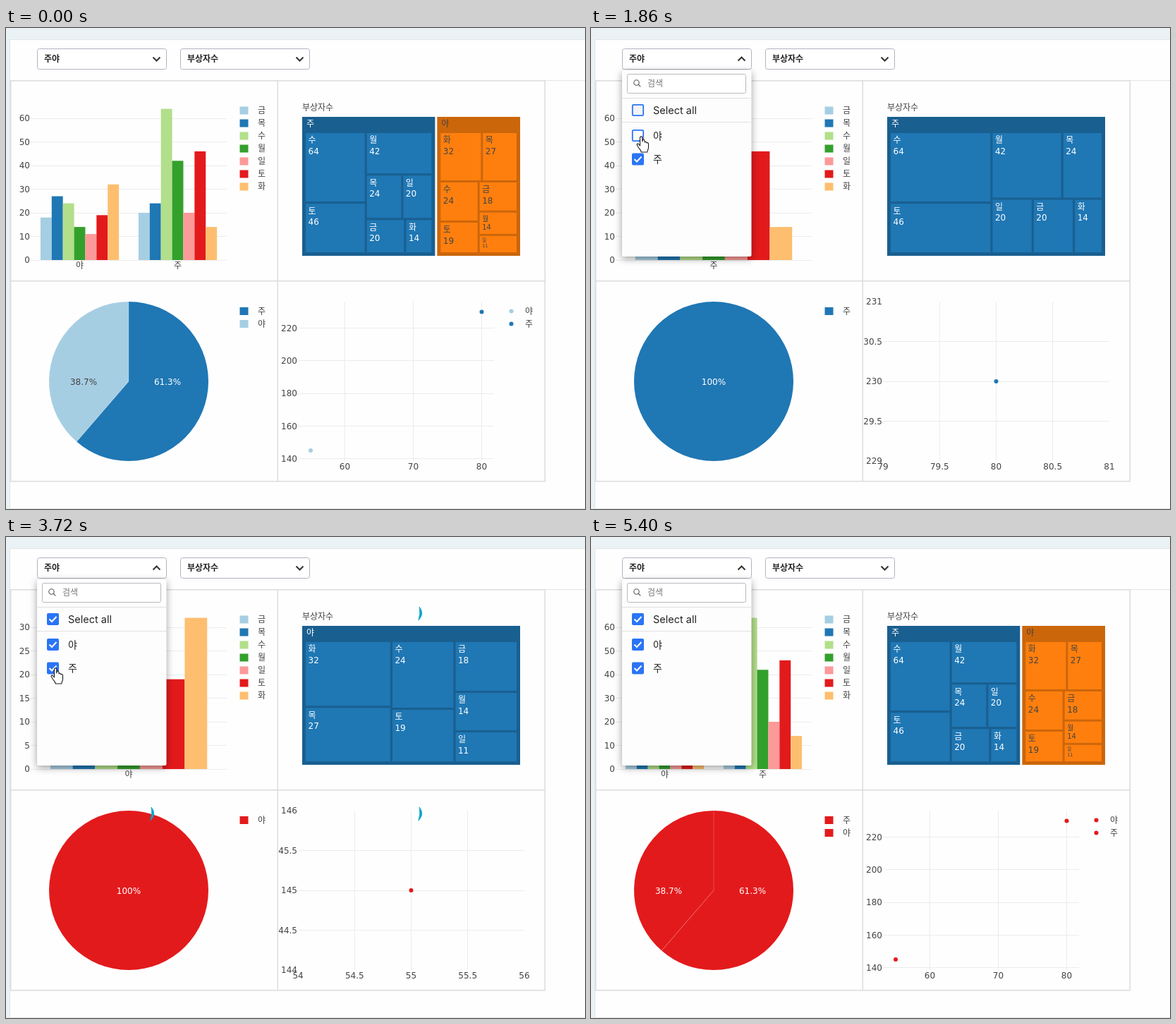
An HTML page with a canvas that plays this animation: 821 px wide and 682 px high, repeating every 5970 ms.

```html
<!DOCTYPE html>
<html lang="ko">
<head>
<meta charset="utf-8">
<title>Dashboard filter</title>
<style>
  html, body { margin: 0; width: 100%; height: 100%; overflow: hidden; background: #fefefe; }
  canvas { display: block; }
</style>
</head>
<body>
<canvas id="stage" width="821" height="682"></canvas>
<script>
const ctx = document.getElementById('stage').getContext('2d');
const LOOP = 5970;
const CHART_FONT = '"DejaVu Sans", "Noto Sans CJK KR", "Noto Sans CJK", sans-serif';
const UI_FONT = 'Inter, "Noto Sans CJK KR", "Noto Sans CJK", sans-serif';
const BLUE = '#1f77b4', RED = '#e31a1c', PALE = '#a6cee3', INK = '#444', GRID = '#ececec';
const DAYS = [...'금목수월일토화'];
const PALETTE = [PALE, BLUE, '#b2df8a', '#33a02c', '#fb9a99', RED, '#fdbf6f'];
const NIGHT = { name: '야', values: [18, 27, 24, 14, 11, 19, 32], x: 55, y: 145 };
const DAY = { name: '주', values: [20, 24, 64, 42, 20, 46, 14], x: 80, y: 230 };

// Chart states: start time, colour per group (null = filtered out)
const STATES = [
  { from: 0, night: PALE, day: BLUE },
  { from: 1830, night: null, day: BLUE },
  { from: 2490, night: RED, day: BLUE },
  { from: 3210, night: RED, day: null },
  { from: 3990, night: RED, day: RED },
];
const LOADS = [[1560, 1830], [2280, 2490], [2910, 3210], [3720, 3990]];
const CURSOR = [
  [90, 800, 46], [120, 617, 60], [150, 341, 74], [180, 200, 76], [240, 98, 70], [330, 115, 62],
  [450, 131, 60], [960, 131, 60], [1140, 110, 105], [1260, 80, 161], [1380, 71, 154],
  [2300, 71, 154], [2490, 69.5, 183], [2580, 70, 186], [4590, 70, 186], [4700, 222, 378],
  [4800, 302, 426], [4920, 403, 476], [5160, 447, 549], [5190, 441, 566], [5220, 402, 572],
  [5280, 315, 536], [5310, 290, 528], [5340, 288, 482], [5370, 650, 228], [5400, 650, 228],
];

const total = list => list.reduce((a, b) => a + b, 0);
const between = (t, a, b) => t >= a && t < b;
const clamp = v => Math.max(0, Math.min(1, v));
const easeInOut = v => { v = clamp(v); return v < .5 ? 4 * v ** 3 : 1 - (2 - 2 * v) ** 3 / 2; };
// Approximates cubic-bezier(.4, 0, .2, 1)
const easeStandard = v => easeInOut(clamp(v) ** .8);

function text(str, x, y, { size = 12, color = INK, align = 'left', weight = 400, font = CHART_FONT } = {}) {
  ctx.font = `${weight} ${size}px ${font}`;
  ctx.textAlign = align;
  ctx.fillStyle = color;
  ctx.fillText(str, x, y + size * .37);
}
function rect(x, y, w, h, color) {
  ctx.fillStyle = color;
  ctx.fillRect(x, y, w, h);
}
function line(points, color, width = 1) {
  ctx.beginPath();
  points.forEach(([x, y]) => ctx.lineTo(x, y));
  ctx.strokeStyle = color;
  ctx.lineWidth = width;
  ctx.stroke();
}
function box(x, y, w, h, r, fill, stroke, width = 1) {
  ctx.beginPath();
  ctx.roundRect(x, y, w, h, r);
  if (fill) { ctx.fillStyle = fill; ctx.fill(); }
  if (stroke) { ctx.strokeStyle = stroke; ctx.lineWidth = width; ctx.stroke(); }
}
function dot(x, y, color, r = 3) {
  ctx.beginPath();
  ctx.arc(x, y, r, 0, 7);
  ctx.fillStyle = color;
  ctx.fill();
}
const hLine = (y, x0, x1, color = GRID) => rect(x0, Math.floor(y), x1 - x0, 1, color);
const vLine = (x, y0, y1, color = GRID) => rect(Math.floor(x), y0, 1, y1 - y0, color);

function page() {
  rect(0, 0, 821, 682, '#ebf2f5');
  rect(5, 16, 816, 666, '#e3e5e6');
  rect(6, 17, 815, 664, '#fefefe');
  hLine(74, 6, 821, '#e4e4e4');
  for (const y of [74, 358, 642]) rect(6, y, 759, 1.5, '#dcdcdc');
  for (const x of [6, 384.5, 763.5]) rect(x, 74, 1.5, 569, '#dcdcdc');
}

function select(x, label, open) {
  box(x + .5, 29.5, 183, 29, 3, '#fff', '#b3b1c2');
  text(label, x + 10, 44, { weight: 700, color: '#222', font: UI_FONT });
  const d = open ? -2.5 : 2.5;
  line([[x + 164.5, 44 - d], [x + 169.5, 44 + d], [x + 174.5, 44 - d]], '#333', 2);
}

function barChart(groups) {
  const step = 278 / groups.length, width = step * .8 / 7;
  const unit = groups.includes(DAY) ? 10 : 5;
  for (let i = 0; i < 7; i++) {
    const y = 329 - i * 33.5;
    hLine(y, 35, 313);
    text(i * unit, 34, y, { align: 'right' });
  }
  groups.forEach((group, g) => {
    const mid = 35 + step * (g + .5);
    group.values.forEach((v, i) => {
      const h = v / unit * 33.5;
      rect(mid + (i - 3.5) * width, 329 - h, width, h, PALETTE[i]);
    });
    text(group.name, mid, 337, { align: 'center' });
  });
  DAYS.forEach((day, i) => legend(day, 117 + 18 * i, PALETTE[i]));
}
function legend(label, y, color) {
  rect(331.5, y - 5.5, 12, 11, color);
  text(label, 357, y);
}

// Squarified layout of items sorted by falling value, with a gap of 3 between tiles
function squarify(items, x0, y0, x1, y1) {
  const tiles = [];
  let rest = total(items.map(d => d.value));
  x0 -= 1.5; y0 -= 1.5; x1 += 1.5; y1 += 1.5;
  for (let i = 0, j; i < items.length; i = j) {
    const dx = x1 - x0, dy = y1 - y0, alpha = Math.max(dx / dy, dy / dx) / rest;
    const worst = (sum, last) => Math.max(items[i].value / (sum * sum * alpha), sum * sum * alpha / last);
    let sum = items[i].value, ratio = worst(sum, sum);
    for (j = i + 1; j < items.length; j++) {
      const v = items[j].value, next = worst(sum + v, v);
      if (next > ratio) break;
      ratio = next;
      sum += v;
    }
    const across = dx < dy, depth = (across ? dy : dx) * sum / rest;
    let pos = across ? x0 : y0;
    for (const item of items.slice(i, j)) {
      const len = (across ? dx : dy) * item.value / sum;
      const [x, y, w, h] = across ? [pos, y0, len, depth] : [x0, pos, depth, len];
      tiles.push({ item, x: x + 1.5, y: y + 1.5, w: w - 3, h: h - 3 });
      pos += len;
    }
    if (across) y0 += depth; else x0 += depth;
    rest -= sum;
  }
  return tiles;
}

function treemap(groups) {
  const styles = [[BLUE, '#195f90', '#fff'], ['#ff7f0e', '#cc660b', INK]];
  const roots = groups.map(group => ({ group, value: total(group.values) })).sort((a, b) => b.value - a.value);
  text('부상자수', 420, 113);
  squarify(roots, 420, 126, 729, 323).forEach(({ item, x, y, w, h }, n) => {
    const [fill, dark, color] = styles[n];
    rect(x, y, w, h, dark);
    text(item.group.name, x + 6, y + 10, { color });
    const leaves = item.group.values.map((value, i) => ({ value, name: DAYS[i] }))
      .reverse().sort((a, b) => b.value - a.value);
    for (const tile of squarify(leaves, x + 5, y + 23, x + w - 5, y + h - 5)) {
      const scale = Math.min(1, (tile.h - 9.5) / 25), size = 12 * scale;
      rect(tile.x, tile.y, tile.w, tile.h, fill);
      text(tile.item.name, tile.x + 3.5, tile.y + 10 * scale, { size, color });
      text(tile.item.value, tile.x + 3.5, tile.y + 25.3 * scale, { size, color });
    }
  });
}

function pieChart({ night, day }) {
  const slice = (a, b, color) => {
    ctx.beginPath();
    ctx.moveTo(174, 501);
    ctx.arc(174, 501, 113, a - Math.PI / 2, b - Math.PI / 2);
    ctx.fillStyle = color;
    ctx.fill();
  };
  const label = (str, x, color = '#fff') => text(str, x, 501.5, { align: 'center', color });
  if (night && day) {
    const turn = Math.PI * 2, cut = turn * 230 / 375;
    slice(0, cut, day);
    slice(cut, turn, night);
    const edge = [174 + 113 * Math.sin(cut), 501 - 113 * Math.cos(cut)];
    line([[174, 388], [174, 501], edge], 'rgba(255,255,255,.3)', .7);
    label('61.3%', 229);
    label('38.7%', 110, night === PALE ? INK : '#fff');
    legend('주', 401.5, day);
    legend('야', 419.5, night);
  } else {
    dot(174, 501, night || day, 113);
    label('100%', 174);
    legend(night ? '야' : '주', 401.5, night || day);
  }
}

function scatter({ night, day }) {
  ctx.save();
  ctx.beginPath();
  ctx.rect(386, 360, 378, 282);
  ctx.clip();
  if (night && day) {
    const px = v => 480.5 + (v - 60) * 9.7, py = v => 610.5 - (v - 140) * 2.312;
    for (const v of [60, 70, 80]) { vLine(px(v), 388, 614); text(v, px(v), 622, { align: 'center' }); }
    for (const v of [140, 160, 180, 200, 220]) { hLine(py(v), 415, 692); text(v, 413, py(v), { align: 'right' }); }
    dot(px(55), py(145), night);
    dot(px(80), py(230), day);
    [['야', night], ['주', day]].forEach(([name, color], i) => {
      dot(716.5, 401.5 + 18 * i, color);
      text(name, 736, 401.5 + 18 * i);
    });
  } else {
    const group = night ? NIGHT : DAY;
    for (let i = -2; i <= 2; i++) {
      const x = 574.5 + i * 80.2, y = 501 - i * 56.5;
      if (Math.abs(i) < 2) { vLine(x, 388, 614); hLine(y, 415, 735); }
      text(group.x + i / 2, x, 622, { align: 'center' });
      text(group.y + i / 2, 413, y, { align: 'right' });
    }
    dot(574.5, 501, night || day);
  }
  ctx.restore();
}

function loading(since) {
  rect(6, 74, 759, 569, `rgba(0,0,0,${.05 * clamp(since / 120)})`);
  for (const [x, y] of [[197, 108], [577, 108], [197, 392], [577, 392]]) {
    ctx.save();
    ctx.translate(x, y);
    ctx.rotate((since - 240) / 1000 * Math.PI * 2);
    ctx.beginPath();
    ctx.moveTo(-9.5, 8.5);
    ctx.quadraticCurveTo(0, 17, 9.5, 8.5);
    ctx.quadraticCurveTo(0, 11, -9.5, 8.5);
    ctx.fillStyle = ctx.strokeStyle = '#0ba5c8';
    ctx.lineWidth = .8;
    ctx.fill();
    ctx.stroke();
    ctx.restore();
  }
}

function checkRow(label, y, checked, size, partial) {
  if (checked) {
    box(58, y - 8.5, 17, 17, 2, '#2a74f6');
    line([[61.5, y], [65, y + 3.5], [71.5, y - 3.5]], '#fff', 2);
  } else {
    box(58.8, y - 7.7, 15.4, 15.4, 1.5, partial ? '#f2f3f5' : '#fff', '#2a74f6', 1.8);
  }
  text(label, 88, y, { size, color: '#222', font: UI_FONT });
}

function dropdown(t) {
  const since = t - 680;
  if (since <= 10) return;
  const scale = .75 + .25 * easeStandard(since / 200);
  ctx.save();
  ctx.globalAlpha = easeStandard(since / 302);
  ctx.translate(44, 59);
  ctx.scale(scale, scale * scale);
  ctx.translate(-44, -59);
  ctx.save();
  ctx.shadowColor = 'rgba(0,0,0,.38)';
  ctx.shadowBlur = 11;
  ctx.shadowOffsetY = 3;
  box(44, 60, 183.5, 264, 2, '#fdfdfd');
  ctx.restore();
  box(51.5, 65.5, 168, 27, 2, '#fff', '#b8b8c0');
  ctx.beginPath();
  ctx.arc(64.5, 77.5, 3.7, 0, 7);
  ctx.strokeStyle = '#555';
  ctx.lineWidth = 1.1;
  ctx.stroke();
  line([[67.2, 80.2], [70.3, 83.3]], '#555', 1.2);
  text('검색', 80, 78.5, { color: '#777', font: UI_FONT });
  hLine(99, 44, 227, '#e0e0e0');
  hLine(133, 44, 227, '#e0e0e0');
  const night = !between(t, 1560, 2280), day = !between(t, 2910, 3720);
  checkRow('Select all', 116.5, night && day, 14.5, true);
  checkRow('야', 152.5, night, 14);
  checkRow('주', 186, day, 14);
  ctx.restore();
}

const ARROW = new Path2D('M0 0V15.5L3.7 12.2L6.2 18L8.6 17L6.1 11.2H11Z');
const HAND = new Path2D('M-1.5 1.5C-1.5-.7 1.8-.7 1.8 1.5V7C3-.0 5.2 6 5.2 8C6 6.8 8 7.4 8 9C9 8 10.5 8.6 10.5 10.3V15.5C10.5 18 8.8 19 8.8 22H.2C.2 19.5-2 18-3.6 15.5L-5.8 11.8C-6.4 10.2-4.2 9.4-3.2 11L-1.5 13Z');

function cursor(t) {
  const i = CURSOR.findIndex(([time]) => time > t);
  if (i < 1) return;
  const [t0, x0, y0] = CURSOR[i - 1], [t1, x1, y1] = CURSOR[i];
  const k = (t - t0) / (t1 - t0);
  ctx.save();
  ctx.translate(x0 + (x1 - x0) * k, y0 + (y1 - y0) * k);
  const shape = between(t, 1200, 4600) ? HAND : ARROW;
  ctx.fillStyle = '#fff';
  ctx.strokeStyle = '#1a1a1a';
  ctx.lineWidth = 1.1;
  ctx.lineJoin = 'round';
  ctx.fill(shape);
  ctx.stroke(shape);
  ctx.restore();
}

function draw(t) {
  const state = STATES.findLast(s => t >= s.from);
  const groups = [state.night && NIGHT, state.day && DAY].filter(Boolean);
  const load = LOADS.find(([a, b]) => between(t, a, b));
  page();
  select(44, '주야', t >= 690);
  select(247, '부상자수', false);
  barChart(groups);
  treemap(groups);
  pieChart(state);
  scatter(state);
  if (load) loading(t - load[0]);
  dropdown(t);
  cursor(t);
}

const start = performance.now();
function frame() {
  draw((performance.now() - start) % LOOP);
  requestAnimationFrame(frame);
}
frame();
</script>
</body>
</html>
```
